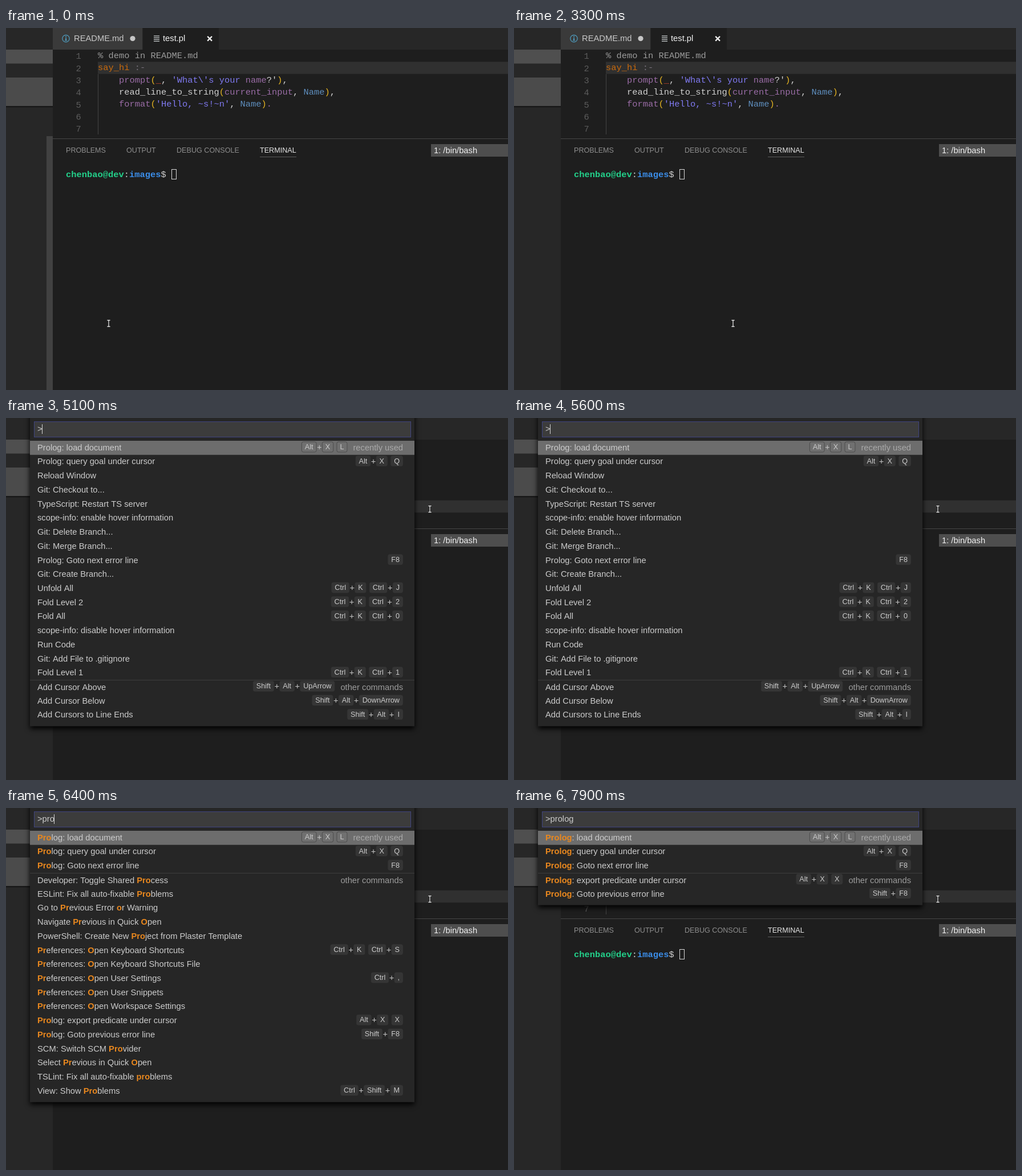
An HTML page with a canvas that plays this animation: 880 px wide and 636 px high, repeating every 8000 ms.

```html
<!DOCTYPE html>
<html lang="en">
<head>
<meta charset="utf-8">
<title>Command palette</title>
<style>
  html, body { margin: 0; width: 100%; height: 100%; overflow: hidden; background: #1e1e1e; }
  canvas { display: block; }
</style>
</head>
<body>
<canvas id="stage" width="880" height="636"></canvas>
<script>
const ctx = document.getElementById('stage').getContext('2d');
const SANS = '"Liberation Sans", Arial, sans-serif';
const MONO = '"Liberation Mono", "Courier New", monospace';
const UI = `14.72px ${SANS}`, KEY = `12.65px ${SANS}`, CODE = `15.42px ${MONO}`;
const LOOP = 8000, LINE = 21.35, ROW = 24.725;

const GREY = '#d0d0d0', GOLD = '#e6b422', PURPLE = '#9a6ca6', STRING = '#807af2',
      BLUE = '#5f8fbf', ORANGE = '#ca6a0c';

const code = [
  [['% demo in README.md', '#9b9b9b']],
  [['say_hi', ORANGE], [' :-', '#77707a']],
  [['    prompt', PURPLE], ['(', GOLD], ['_', '#c8452d'], [', ', GREY], ["'What\\'s your ", STRING],
   ['name', PURPLE], ["?'", GREY], [')', GOLD], [',', GREY]],
  [['    read_line_to_string', GREY], ['(', GOLD], ['current_input', PURPLE], [', ', GREY],
   ['Name', BLUE], [')', GOLD], [',', GREY]],
  [['    format', PURPLE], ['(', GOLD], ["'Hello, ~s!~n'", STRING], [', ', GREY],
   ['Name', BLUE], [')', GOLD], ['.', PURPLE]]
];

const parse = list => list.trim().split('\n').map(s => s.trim().split('|'));

const recent = parse(`
  Prolog: load document|Alt+X L
  Prolog: query goal under cursor|Alt+X Q
  Reload Window
  Git: Checkout to...
  TypeScript: Restart TS server
  scope-info: enable hover information
  Git: Delete Branch...
  Git: Merge Branch...
  Prolog: Goto next error line|F8
  Git: Create Branch...
  Unfold All|Ctrl+K Ctrl+J
  Fold Level 2|Ctrl+K Ctrl+2
  Fold All|Ctrl+K Ctrl+0
  scope-info: disable hover information
  Run Code
  Git: Add File to .gitignore
  Fold Level 1|Ctrl+K Ctrl+1`);

const others = parse(`
  Add Cursor Above|Shift+Alt+UpArrow
  Add Cursor Below|Shift+Alt+DownArrow
  Add Cursors to Line Ends|Shift+Alt+I
  Add Selection To Previous Find Match
  AhaLaTex: Compile|Ctrl+Shift+L
  Convert a REST-URL with json result to TypeScript interfaces|Ctrl+Alt+X
  Convert Indentation to Spaces
  Convert json clipboard to TypeScript interfaces|Ctrl+Alt+V
  Copy|Ctrl+C
  Copy Line Down|Ctrl+Shift+Alt+DownArrow
  Copy Line Up|Ctrl+Shift+Alt+UpArrow
  Copy With Syntax Highlighting
  Debug: Add Conditional Breakpoint...
  Debug: Add Function Breakpoint
  Debug: Column Breakpoint|Shift+F9
  Debug: Disable All Breakpoints
  Debug: Enable All Breakpoints
  Developer: Toggle Shared Process
  ESLint: Fix all auto-fixable Problems
  Go to Previous Error or Warning
  Navigate Previous in Quick Open
  PowerShell: Create New Project from Plaster Template
  Preferences: Open Keyboard Shortcuts|Ctrl+K Ctrl+S
  Preferences: Open Keyboard Shortcuts File
  Preferences: Open User Settings|Ctrl+,
  Preferences: Open User Snippets
  Preferences: Open Workspace Settings
  Prolog: export predicate under cursor|Alt+X X
  Prolog: Goto previous error line|Shift+F8
  SCM: Switch SCM Provider
  Select Previous in Quick Open
  TSLint: Fix all auto-fixable problems
  View: Show Problems|Ctrl+Shift+M`);

// Start time of each typed query
const queries = [[5100, ''], [6200, 'p'], [6300, 'pr'], [6400, 'pro'],
                 [6600, 'prol'], [6700, 'prolo'], [6900, 'prolog']];
// Pointer places, one per 100 ms
const path = [[180, 519], [384, 519], [560, 455], [655, 340], [705, 245], [738, 190], [752, 168], [743, 160]];

function rect(x, y, w, h, color) {
  ctx.fillStyle = color;
  ctx.fillRect(x, y, w, h);
}

// Draws text and returns the x where it ends
function text(s, x, y, color, font = UI) {
  ctx.font = font;
  ctx.fillStyle = color;
  ctx.fillText(s, x, y);
  return x + ctx.measureText(s).width;
}

function width(s, font = UI) {
  ctx.font = font;
  return ctx.measureText(s).width;
}

function line(points, color, w) {
  ctx.beginPath();
  points.forEach(([x1, y1, x2, y2]) => { ctx.moveTo(x1, y1); ctx.lineTo(x2, y2); });
  ctx.strokeStyle = color;
  ctx.lineWidth = w;
  ctx.stroke();
}

function circle(x, y, r) {
  ctx.beginPath();
  ctx.arc(x, y, r, 0, 7);
}

function drawSidebar(t) {
  rect(0, 0, 82, 636, '#272727');
  rect(0, 38, 82, 24.5, '#4f4f4f');
  rect(0, 87, 82, 50, '#4b4b4b');
  rect(0, 137, 82, 2, '#181818');
  rect(0, 139, 82, 1, '#202020');
  if (t < 400) rect(71, 190, 11, 446, t < 100 ? '#414141' : '#343434');
}

function drawTabs() {
  rect(82, 0, 798, 38, '#272727');
  rect(82, 0, 157, 38, '#3a3a3a');
  rect(240, 0, 133, 38, '#1e1e1e');

  circle(105, 18.5, 6.2);
  ctx.strokeStyle = '#4f9fc2';
  ctx.lineWidth = 1.2;
  ctx.stroke();
  rect(104.2, 14.5, 1.8, 1.8, '#4f9fc2');
  rect(104.2, 17.5, 1.8, 4.5, '#4f9fc2');
  rect(103, 21.3, 4.2, 1, '#4f9fc2');
  text('README.md', 119, 23.4, '#c8c8c8');
  circle(222, 18.5, 4.6);
  ctx.fillStyle = '#c6c6c6';
  ctx.fill();

  for (let i = 0; i < 4; i++) rect(259, 13.3 + i * 3.1, 10, 1.3, '#c4c8c9');
  text('test.pl', 275, 23.4, '#f4f4f4');
  line([[353.2, 14.8, 361, 22.6], [361, 14.8, 353.2, 22.6]], '#f2f2f2', 2.3);
}

function drawEditor(t) {
  const active = t < 4100 ? 1 : 5;
  rect(161, 38 + active * LINE, 719, LINE, '#303030');
  rect(161, 81, 1, 106, '#444');
  for (let i = 0; i < 7; i++) {
    text(i + 1, 122.5, 54.3 + i * LINE, '#5c5c5c', CODE);
    let x = 161;
    for (const [s, color] of code[i] || []) x = text(s, x, 53 + i * LINE, color, CODE);
  }
  if (t >= 4100 && t < 4600) rect(189, 145, 9, 21, '#c9782b');
}

function drawPanel() {
  rect(82, 194, 798, 1, '#464646');
  [['PROBLEMS', 105], ['OUTPUT', 211], ['DEBUG CONSOLE', 299], ['TERMINAL', 445]].forEach(([s, x], i) =>
    text(s, x, 218.5, i === 3 ? '#e7e7e7' : '#8e8e8e', `12.6px ${SANS}`));
  rect(445, 226, 64, 1, '#5c5c5c');
  rect(745, 204, 135, 22, '#4e4e4e');
  text('1: /bin/bash', 750, 220, '#f0f0f0');

  let x = text('chenbao@dev', 105, 261.5, '#23d18b', 'bold ' + CODE);
  x = text(':', x, 261.5, '#d0d0d0', CODE);
  x = text('images', x, 261.5, '#3b8eea', 'bold ' + CODE);
  text('$', x, 261.5, '#d0d0d0', CODE);
  ctx.strokeStyle = '#d8d8d8';
  ctx.lineWidth = 1;
  ctx.strokeRect(290.5, 248.5, 8, 17);
}

function drawPointer(t) {
  const step = Math.floor((t - 3200) / 100);
  const [x, y] = path[Math.max(0, Math.min(7, step))];
  const beam = [[x, y - 5.5, x, y + 5.5], [x - 2.6, y - 5.5, x + 2.6, y - 5.5], [x - 2.6, y + 5.5, x + 2.6, y + 5.5]];
  line(beam, '#111', 3);
  line(beam, '#e8e8e8', 1.3);
}

// Splits a title into plain and matched parts in turn, or gives a falsy value
function split(title, q) {
  const m = title.match(RegExp(`^(.*?)(${q})(.*)$`, 'i')) ||
    (q === 'pro' && title.match(/^(.*?)(pr)(.*?\b)(o)(.*)$/i));
  return m && m.slice(1);
}

// Key caps, laid out leftwards from the right edge
function drawKeys(keys, right, base) {
  const tokens = keys.split(/([+ ])/).reverse();
  for (const k of tokens) {
    if (k === ' ') {
      right -= 5.2;
    } else if (k === '+') {
      right -= 9.2;
      text('+', right + 0.4, base + 1, '#c4c4c4');
    } else {
      const w = width(k, KEY) + 12;
      right -= w;
      ctx.beginPath();
      ctx.roundRect(right + 0.5, base - 13.2, w - 1, 18, 3);
      ctx.fillStyle = 'rgba(128,128,128,.17)';
      ctx.fill();
      ctx.strokeStyle = 'rgba(56,56,56,.6)';
      ctx.lineWidth = 1;
      ctx.stroke();
      text(k, right + 6, base, '#cccccc', KEY);
    }
  }
}

function drawPalette(t) {
  const q = queries.filter(([start]) => t >= start).pop()[1];
  const fits = ([title]) => split(title, q);
  const first = recent.filter(fits);
  const rows = [...first, ...others.filter(fits)].slice(0, 20);

  ctx.save();
  ctx.shadowColor = '#000';
  ctx.shadowBlur = 9;
  ctx.shadowOffsetY = 4;
  rect(42, -10, 674, 57 + rows.length * ROW, '#262626');
  ctx.restore();

  rect(49, 6, 661, 28, '#3f4480');
  rect(50, 7, 659, 26, '#3c3c3c');
  const end = text('>' + q, 55, 24, '#cccccc');
  if (t < 7900) rect(Math.floor(end), 11, 1, 17, '#d4d4d4');

  rect(42, 40, 674, ROW, '#6d6d6d');
  rows.forEach(([title, keys], i) => {
    const top = 40 + i * ROW;
    const head = i === first.length;
    const base = top + (head ? 17.4 : 16.72);
    let x = 55, right = 696;
    split(title, q).forEach((s, n) => {
      x = n % 2 ? text(s, x, base, '#e8871e', 'bold ' + UI) : text(s, x, base, '#cccccc');
    });
    if (head) rect(42, Math.round(top), 674, 1, '#3d3d3d');
    if (!i || head) {
      const note = i ? 'other commands' : 'recently used';
      right -= width(note);
      text(note, right, base, i ? '#9c9c9c' : '#a9a9a9');
      right -= 10;
    }
    if (keys) drawKeys(keys, right, top + 15.06);
  });
}

function draw(t) {
  rect(0, 0, 880, 636, '#1e1e1e');
  drawSidebar(t);
  drawTabs();
  drawEditor(t);
  drawPanel();
  if (t >= 5100) drawPalette(t);
  drawPointer(t);
}

const begin = performance.now();
function tick() {
  draw((performance.now() - begin) % LOOP);
  requestAnimationFrame(tick);
}
tick();
</script>
</body>
</html>
```
